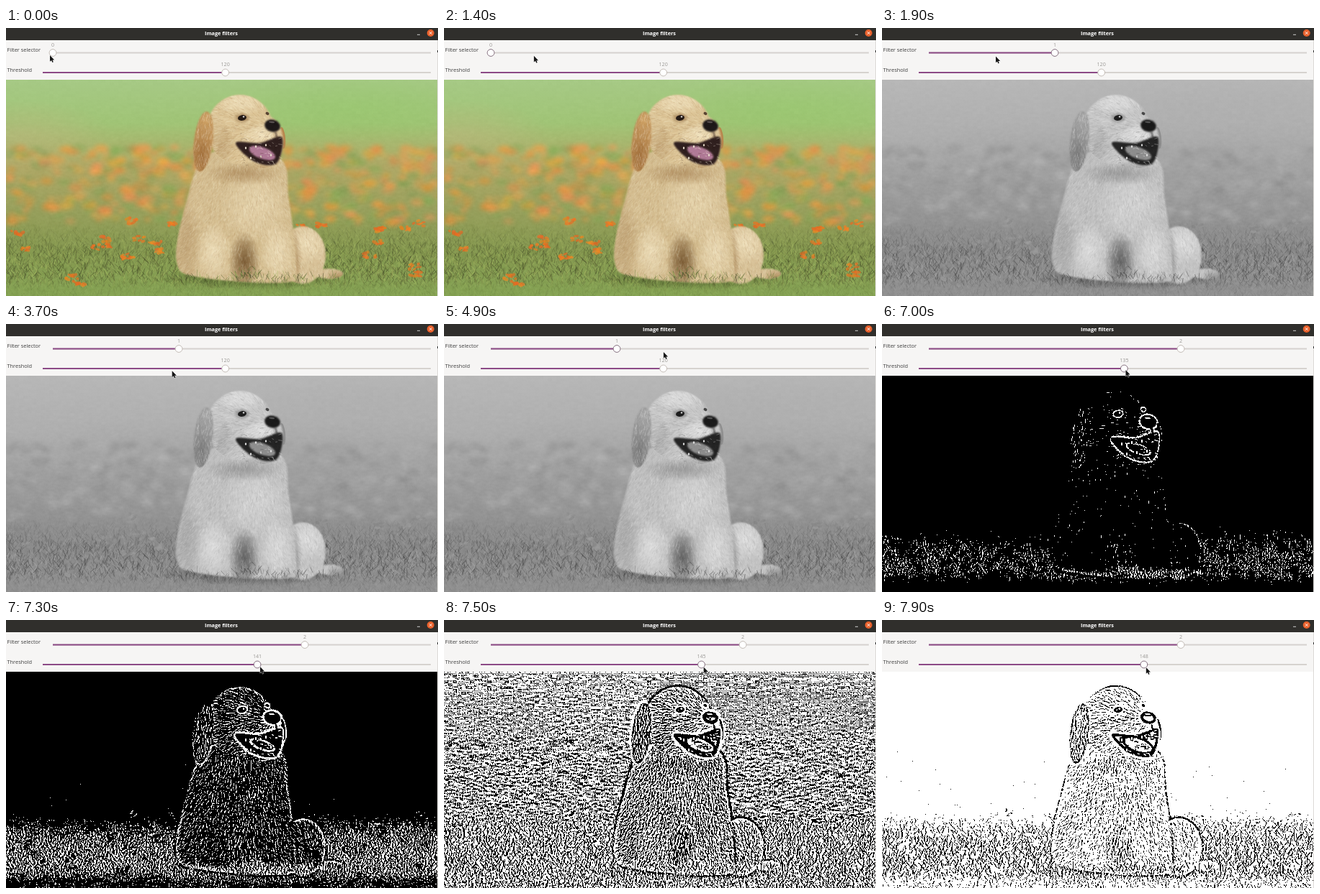
Recreate the animation shown at these times as an HTML page with a canvas. Size 600 by 373 pixels, loop 8000 ms.

```html
<!DOCTYPE html>
<html lang="en">
<head>
<meta charset="utf-8">
<title>Image filters</title>
<style>
  html, body { margin: 0; width: 100%; height: 100%; overflow: hidden; background: #f6f5f4; }
  #stage { position: relative; width: 600px; height: 373px; overflow: hidden; }
  canvas, svg { position: absolute; left: 0; top: 0; display: block; }
  canvas { top: 72px; }
  text { font: 7.4px "Open Sans", "Noto Sans", sans-serif; fill: #3d3d3d; }
  .title { font-size: 7.3px; font-weight: 700; fill: #fff; }
  .value { font-size: 7.1px; fill: #9a9895; }
  .mid { text-anchor: middle; }
  .track { stroke: #d6d2cf; stroke-width: 2; }
  .fill { stroke: #8c4a86; stroke-width: 2; }
  .knob { fill: #fff; stroke: #c3bcb6; stroke-width: 1; }
  .knob.held { stroke: #85707f; }
</style>
</head>
<body>
<div id="stage">
  <canvas id="view" width="600" height="301"></canvas>
  <svg width="600" height="373" viewBox="0 0 600 373">
    <rect y="17" width="600" height="55" fill="#f6f5f4"/>
    <rect width="600" height="17" fill="#302f2c"/>
    <text class="title mid" x="299" y="10">Image filters</text>
    <path d="M571 9.3h4" stroke="#ddd" stroke-width=".9"/>
    <circle cx="589.7" cy="7" r="5" fill="#e9612c"/>
    <path d="M587.8 5.1l3.8 3.8m0-3.8l-3.8 3.8" stroke="#fff" stroke-width=".9"/>
    <rect x="599" y="17" width="1" height="356" fill="#dcdad7"/>
    <rect x="599" y="31" width="1" height="3" fill="#333"/>
    <text x="1.5" y="33">Filter selector</text>
    <text x="1.5" y="60.7">Threshold</text>
    <g id="sliders"></g>
    <path id="cursor" d="M0 0V8.8L2 7 3.4 10 4.8 9.3 3.5 6.5H6.2Z" fill="#151515" stroke="#fff" stroke-width=".8" paint-order="stroke"/>
  </svg>
</div>
<script>
const W = 600, H = 301, TOP = 72, LOOP = 8000;

let seed = 20731;
function rnd() {
  seed = (seed + 0x6D2B79F5) | 0;
  let t = Math.imul(seed ^ (seed >>> 15), 1 | seed);
  t = (t + Math.imul(t ^ (t >>> 7), 61 | t)) ^ t;
  return ((t ^ (t >>> 14)) >>> 0) / 4294967296;
}
const span = (a, b) => a + (b - a) * rnd();
const clamp = (v, a, b) => Math.min(b, Math.max(a, v));
const ramp = (a, b, v) => {
  const k = clamp((v - a) / (b - a), 0, 1);
  return k * k * (3 - 2 * k);
};
const times = (n, draw) => { for (let i = 0; i < n; i++) draw(i); };

function newLayer() {
  const c = document.createElement('canvas');
  c.width = W;
  c.height = H;
  const g = c.getContext('2d', { willReadFrequently: true });
  g.translate(0, -TOP);
  return g;
}

// Smooth closed curve through "x y x y ..." points
function curve(list) {
  const v = list.split(' ').map(Number), n = v.length / 2;
  const at = i => { const k = (i + n) % n; return [v[2 * k], v[2 * k + 1]]; };
  const p = new Path2D();
  p.moveTo(...at(0));
  times(n, i => {
    const [a, b, c, d] = [at(i - 1), at(i), at(i + 1), at(i + 2)];
    p.bezierCurveTo(b[0] + (c[0] - a[0]) / 6, b[1] + (c[1] - a[1]) / 6,
      c[0] - (d[0] - b[0]) / 6, c[1] - (d[1] - b[1]) / 6, c[0], c[1]);
  });
  p.closePath();
  return p;
}

function ellipses(...all) {
  const p = new Path2D();
  for (const [x, y, rx, ry, turn = 0] of all) {
    const e = new Path2D();
    e.ellipse(x, y, rx, ry, turn, 0, 7);
    p.addPath(e);
  }
  return p;
}

function oval(g, x, y, rx, ry, color, turn) {
  g.fillStyle = color;
  g.fill(ellipses([x, y, rx, ry, turn]));
}

function soft(g, x, y, rx, ry, rgb, alpha) {
  g.save();
  g.translate(x, y);
  g.scale(rx, ry);
  const f = g.createRadialGradient(0, 0, 0, 0, 0, 1);
  f.addColorStop(0, `rgba(${rgb},${alpha})`);
  f.addColorStop(.5, `rgba(${rgb},${alpha * .6})`);
  f.addColorStop(1, `rgba(${rgb},0)`);
  oval(g, 0, 0, 1, 1, f);
  g.restore();
}

function blurred(g, radius, draw) {
  g.save();
  g.filter = `blur(${radius}px)`;
  draw();
  g.restore();
}

function stroke(g, x, y, angle, len, width, color) {
  g.strokeStyle = color;
  g.lineWidth = width;
  g.beginPath();
  g.moveTo(x, y);
  g.lineTo(x + Math.cos(angle) * len, y + Math.sin(angle) * len);
  g.stroke();
}

function meadow(g) {
  const base = g.createLinearGradient(0, TOP, 0, 373);
  ['#a6c985', '#a0c476', '#b0a866', '#98a05d', '#84984f', '#86a455']
    .forEach((c, i, all) => base.addColorStop(i / (all.length - 1), c));
  g.fillStyle = base;
  g.fillRect(0, TOP, W, H);
  soft(g, 20, 150, 130, 50, '190,180,125', .5);
  soft(g, 480, 110, 200, 50, '140,200,95', .3);

  const far = newLayer();
  times(480, () => {
    const y = 166 + 105 * Math.pow(rnd(), 1.3), r = span(2, 6);
    const color = rnd() < .7
      ? `rgba(${span(218, 245)},${span(135, 170)},${span(50, 90)},${span(.25, .8)})`
      : `rgba(130,${span(150, 175)},85,.5)`;
    oval(far, span(0, W), y, r * 1.8, r, color);
  });
  blurred(g, 3, () => g.drawImage(far.canvas, 0, TOP));
}

function blade(g, x, y, alpha) {
  const l = 55 + 125 * Math.pow(rnd(), 1.15);
  stroke(g, x, y, -Math.PI / 2 + span(-.9, .9), span(4, 11), .95,
    `rgba(${l * 1.02 | 0},${l * 1.12 | 0},${l * .6 | 0},${alpha})`);
}

function grass(g) {
  times(9000, () => {
    const x = span(0, W), y = span(262, 382);
    const side = x < 240 ? .85 : 1;
    blade(g, x, y, .58 * side * ramp(266, 336, y) * (1 - .82 * ramp(348, 368, y)));
  });
}

function flowers(g) {
  blurred(g, .7, () => times(30, () => {
    const x = span(0, W), y = 268 + 92 * Math.pow(rnd(), 1.5);
    times(7, () => oval(g, x + span(-8, 8), y + span(-4, 4), span(2, 4.5), span(1, 2.5),
      `rgba(${span(220, 245)},${span(100, 140)},35,.7)`, span(-.6, .6)));
  }));
}

function fur(g, [x0, y0, x1, y1], angle, power) {
  times((x1 - x0) * (y1 - y0) / 4.5, () => {
    const x = span(x0, x1), y = span(y0, y1);
    const color = rnd() < .5 ? `rgba(255,248,226,${.32 * power})` : `rgba(145,105,58,${.24 * power})`;
    stroke(g, x, y, angle(x, y) + span(-.4, .4), span(3, 7), .9, color);
  });
}

function part(g, path, color, shade) {
  g.save();
  g.fillStyle = color;
  blurred(g, 1, () => g.fill(path));
  g.clip(path);
  shade();
  g.restore();
}

function face(g) {
  blurred(g, 1, () => {
    g.fillStyle = '#2f1f1e';
    g.fill(curve('319 160 352 160 383 152 376 188 345 186'));
    oval(g, 356, 174, 19, 8, '#b07a96', .35);
    oval(g, 370, 136, 11, 8.5, '#1d1818', .2);
    stroke(g, 374, 144, 1.3, 11, 1.6, '#4a342c');
  });
  blurred(g, .5, () => {
    times(6, i => oval(g, 333 + i * 7, 167 - i + (i % 2) * 15, 1.2, 1.8, '#e6dccb'));
    oval(g, 369, 131, 4, 1.2, '#5a5252', .1);
    soft(g, 328, 125, 12, 8, '120,82,45', .7);
    oval(g, 328, 125, 6, 3.9, '#241a15', -.15);
    oval(g, 330, 123.6, 1.3, 1, '#fff');
    oval(g, 363, 119, 2.6, 2, '#5a4432', .5);
  });
  times(70, () => stroke(g, span(325, 380), span(142, 192), span(-.5, 1.2), span(2, 6), .8,
    rnd() < .5 ? 'rgba(255,245,225,.4)' : 'rgba(70,45,30,.35)'));
}

function puppy(g) {
  const shade = '150,110,62', light = '244,230,196';
  soft(g, 340, 348, 130, 16, '60,75,30', .5);
  part(g, ellipses([412, 316, 32, 40], [448, 342, 20, 7]), '#d8c298', () => {
    soft(g, 420, 300, 26, 30, light, .7);
    soft(g, 399, 325, 12, 45, shade, .6);
    soft(g, 460, 345, 18, 9, shade, .5);
    fur(g, [380, 274, 470, 356], x => 1.2 + (x - 415) / 60, .3);
  });
  part(g, curve('282 175 250 245 237 325 270 347 390 354 403 330 393 240 378 180'), '#d4bd90', () => {
    soft(g, 250, 300, 22, 70, shade, .3);
    soft(g, 345, 245, 50, 55, light, .5);
    for (const x of [288, 377]) soft(g, x, 312, 25, 45, light, .7);
    soft(g, 331, 325, 22, 42, '112,80,42', .9);
    soft(g, 330, 203, 55, 16, shade, .5);
    fur(g, [234, 174, 406, 356], x => Math.PI / 2 - (x - 335) / 130, .33);
  });
  oval(g, 384, 153, 4, 15, '#b8854c', -.1);
  part(g, ellipses([325, 141, 46, 48], [358, 158, 27, 37]), '#dcc496', () => {
    soft(g, 325, 104, 38, 18, light, .7);
    soft(g, 355, 148, 28, 16, light, .8);
    soft(g, 300, 165, 22, 34, shade, .3);
    soft(g, 350, 196, 32, 9, shade, .5);
    fur(g, [278, 92, 388, 198], (x, y) => Math.atan2(y - 138, x - 372), .42);
  });
  part(g, ellipses([274, 158, 13, 42, .12]), '#c1935a', () => {
    soft(g, 272, 180, 17, 34, '150,98,48', .7);
    soft(g, 278, 128, 14, 14, '215,172,108', .6);
    fur(g, [256, 114, 292, 202], () => 1.7, .45);
  });
  face(g);
  times(380, () => {
    const y = span(346, 366);
    blade(g, span(228, 475), y, .5 * (1 - .7 * ramp(350, 366, y)));
  });
  times(22, () => blade(g, span(318, 352), span(336, 350), .8));
}

// Mean over a window of (2rx+1) by (2ry+1) pixels
function box(src, rx, ry) {
  const pass = (a, r, dx, dy) => a.map((_, i) => {
    const x = i % W, y = i / W | 0;
    let s = 0;
    for (let k = -r; k <= r; k++) s += a[clamp(y + k * dy, 0, H - 1) * W + clamp(x + k * dx, 0, W - 1)];
    return s / (2 * r + 1);
  });
  return pass(pass(src, rx, 1, 0), ry, 0, 1);
}

function buildPicture() {
  const g = newLayer();
  [meadow, grass, flowers, puppy].forEach(draw => draw(g));
  const color = g.getImageData(0, 0, W, H), mono = new ImageData(W, H), d = color.data;
  const grain = box(new Float32Array(W * H).map(() => span(-1, 1)), 2, 1);
  const tiles = new Float32Array(100 * 76).map(rnd);
  const luma = new Float32Array(W * H).map((_, i) => {
    const x = i % W, y = i / W | 0, o = i * 4;
    const tile = tiles[(y / 4 | 0) * 100 + (x / 6 | 0)];
    const step = (tile > .8) - (tile < .2);
    const n = grain[i] * 11 * ramp(10, 260, y + 60) + step * (1 - ramp(60, 160, y));
    const l = Math.round(.299 * d[o] + .587 * d[o + 1] + .114 * d[o + 2] + n);
    for (let k = 0; k < 3; k++) {
      d[o + k] += n;
      mono.data[o + k] = l;
    }
    mono.data[o + 3] = 255;
    return l;
  });
  const mean = box(luma, 2, 2);
  return { color, mono, detail: luma.map((l, i) => l - mean[i]) };
}

// Adaptive threshold: compare each pixel with its neighbourhood
function binarize(detail, level) {
  const out = new ImageData(W, H), px = new Uint32Array(out.data.buffer);
  detail.forEach((v, i) => { px[i] = v > 144.65 - level ? 0xffffffff : 0xff000000; });
  return out;
}

function makeSlider(x0, y, max) {
  const add = (tag, attrs) => {
    const el = document.createElementNS('http://www.w3.org/2000/svg', tag);
    for (const k in attrs) el.setAttribute(k, attrs[k]);
    return document.getElementById('sliders').appendChild(el);
  };
  const line = cls => add('line', { class: cls, x1: x0, x2: 590, y1: y, y2: y });
  line('track');
  const fill = line('fill');
  const knob = add('circle', { class: 'knob', cy: y, r: 4.9 });
  const label = add('text', { class: 'value mid', y: y - 8.6 });
  return (value, held) => {
    const x = x0 + (590 - x0) * value / max;
    fill.setAttribute('x2', x);
    knob.setAttribute('cx', x);
    knob.setAttribute('class', held ? 'knob held' : 'knob');
    label.setAttribute('x', x);
    label.textContent = value;
  };
}

// Pointer moves: start, end, x, y; it rests in between
const moves = [
  [200, 400, 65, 33], [600, 1500, 127, 39], [1500, 1600, 149, 39], [1700, 2100, 167, 40],
  [2300, 3000, 242, 83], [3100, 3400, 230, 67], [3600, 4300, 242, 37], [4400, 5200, 334, 40],
  [5300, 5600, 336, 62], [5600, 6000, 307.6, 62], [6100, 7850, 366.8, 66]
];
function pointer(t) {
  let x = 61, y = 38;
  for (const [from, to, x1, y1] of moves) {
    const k = ramp(from, to, t);
    x += (x1 - x) * k;
    y += (y1 - y) * k;
  }
  return [x, y];
}

const picture = buildPicture();
const view = document.getElementById('view').getContext('2d');
const cursor = document.getElementById('cursor');
const setFilter = makeSlider(65, 34.5, 3);
const setLevel = makeSlider(51, 62, 255);
const within = (t, a, b) => t >= a && t < b;
let shown = '';

function render(t) {
  const [x, y] = pointer(t);
  const filter = t < 1800 ? 0 : t < 5100 ? 1 : 2;
  const level = t < 6300 ? 120 : Math.round((x - 54) / 539 * 255);
  cursor.setAttribute('transform', `translate(${x} ${y})`);
  setFilter(filter, within(t, 700, 2400) || within(t, 4500, 5400));
  setLevel(level, t >= 6300);
  const key = filter < 2 ? `${filter}` : `2:${level}`;
  if (key !== shown) {
    const image = filter === 0 ? picture.color : filter === 1 ? picture.mono : binarize(picture.detail, level);
    view.putImageData(image, 0, 0);
    shown = key;
  }
}

const start = performance.now();
function tick() {
  const t = (performance.now() - start) % LOOP;
  render(Math.floor(t / 100) * 100);
  requestAnimationFrame(tick);
}
tick();
</script>
</body>
</html>
```
